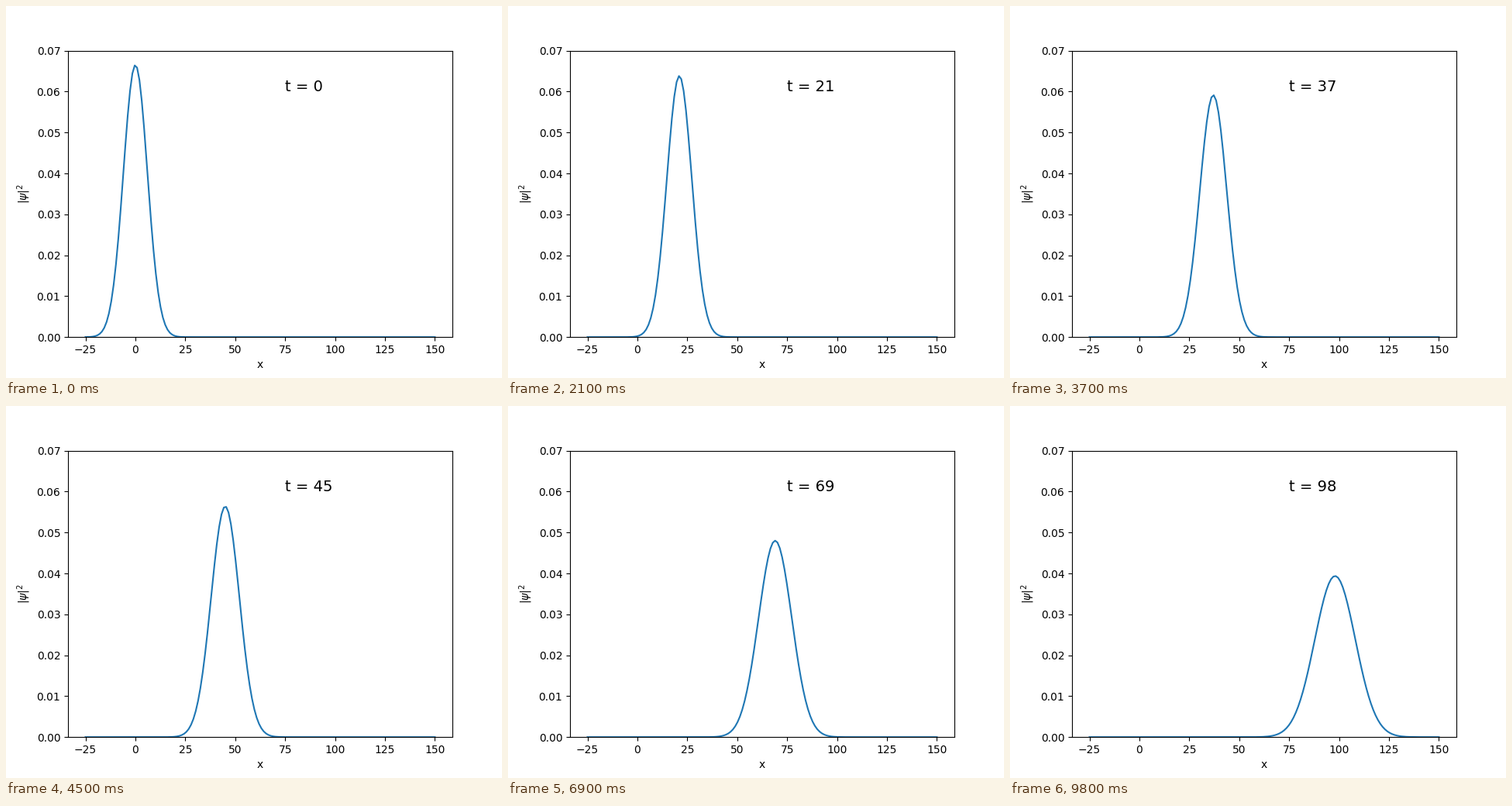
A matplotlib script for the animation above (9900 ms loop, 640 px wide and 480 px high).

```python
import matplotlib.pyplot as plt
import numpy as np
from matplotlib.animation import FuncAnimation

FRAMES = 99
SIGMA = 6.0       # initial width of the packet
VELOCITY = 1.0

x = np.linspace(-25, 150, 150)


def density(t):
    """Free Gaussian wave packet with hbar = m = 1."""
    width = SIGMA * np.sqrt(1 + (t / (2 * SIGMA**2)) ** 2)
    z = (x - VELOCITY * t) / width
    return np.exp(-z**2 / 2) / (np.sqrt(2 * np.pi) * width)


fig, ax = plt.subplots(figsize=(6.4, 4.8), dpi=100)
line, = ax.plot(x, density(0))
label = ax.text(75, 0.06, "t = 0", fontsize=14)
ax.set_ylim(0, 0.07)
ax.set_xlabel("x")
ax.set_ylabel(r"$|\psi|^2$")


def update(t):
    line.set_ydata(density(t))
    label.set_text(f"t = {t}")
    return line, label


anim = FuncAnimation(fig, update, frames=FRAMES, interval=100,
                     repeat=True, repeat_delay=0)
plt.show()
```
